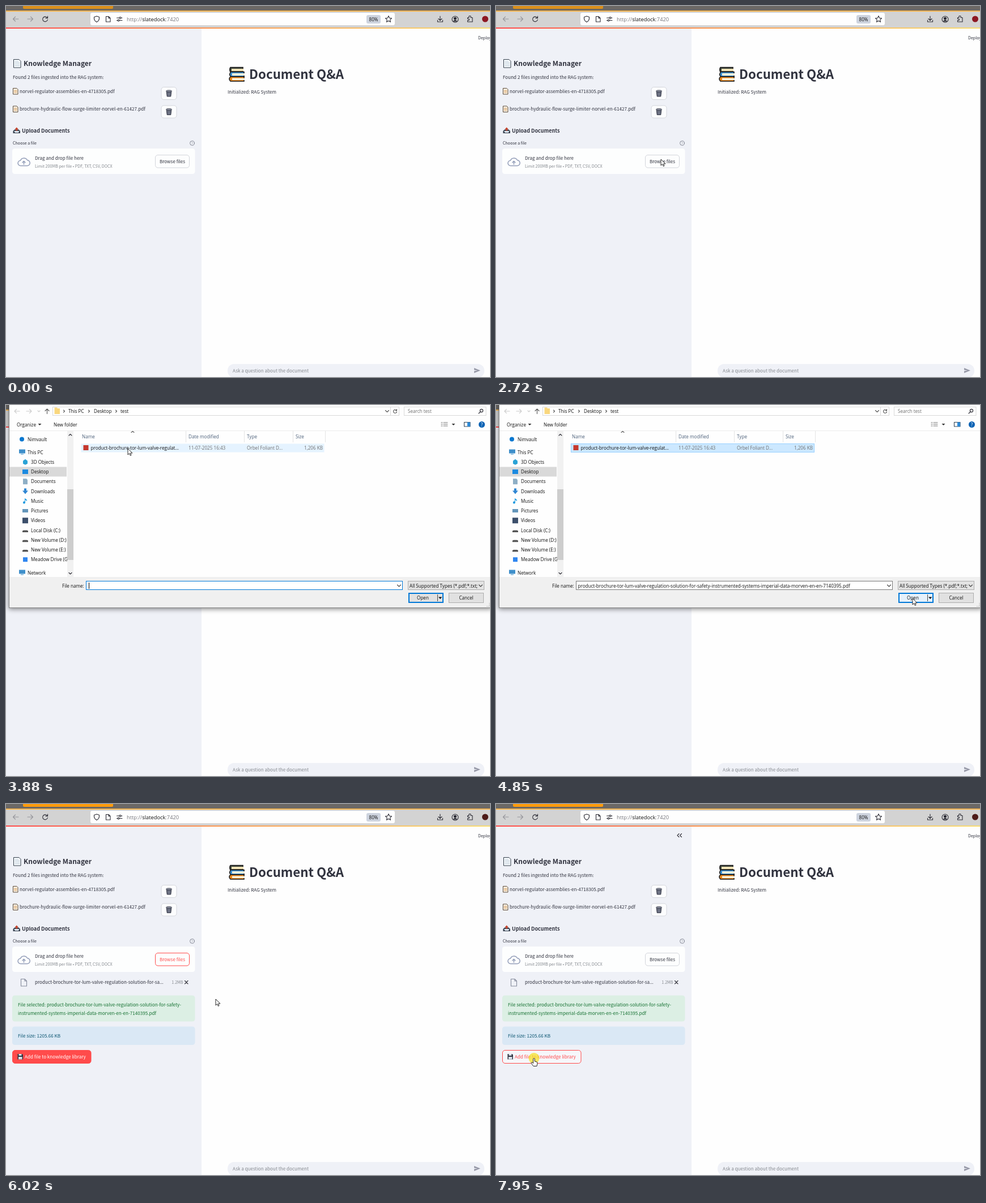
Write an HTML page that moves like this. It is 854 px wide and 656 px high and loops after 8 s.

```html
<!DOCTYPE html>
<html lang="en">
<head>
<meta charset="utf-8">
<title>Document upload</title>
<style>
html, body { margin: 0; width: 100%; height: 100%; overflow: hidden; background: #fefefe }
svg { display: block; width: 854px; height: 656px }
text { font: 8.11px "Noto Sans CJK JP", "Noto Sans CJK SC", "Noto Sans", sans-serif; fill: #31333f; white-space: pre }
.ui { font: 8.15px "Open Sans", "Noto Sans", sans-serif; fill: #111 }
.ui text { font: inherit; fill: inherit }
.small { font-size: 7.1px }
.grey { fill: #85898f }
.line { fill: none; stroke: #2c2c35; stroke-width: 1.1; stroke-linecap: round; stroke-linejoin: round }
.mid { text-anchor: middle }
.end { text-anchor: end }
.bold { font-weight: 700 }
.ui .head { fill: #4c607a }
.ui .dim { fill: #6d6d6d }
#dialog { filter: drop-shadow(0 2px 4px #0007) }
</style>
</head>
<body>
<svg viewBox="0 0 854 656">
<defs>
  <linearGradient id="glow"><stop stop-color="#ff4b4b"/><stop offset=".45" stop-color="#fb9a52"/><stop offset="1" stop-color="#f7dc72"/></linearGradient>
  <clipPath id="navClip"><path d="M6 46H108V304H6Z"/></clipPath>
  <g id="sheet">
    <path d="M.5.5H7L9 2.5V11H.5Z" fill="#fbf7ee" stroke="#5b4630"/>
    <path d="M2 4H7.5M2 6H7.5M2 8H7.5" stroke="#d08a3c" stroke-width=".8"/>
  </g>
  <g id="bin">
    <rect x=".5" y=".5" width="27" height="22" rx="4.5" fill="#fcfdfe" stroke="#d3d5db"/>
    <path d="M9.5 7.5H18.5L17.3 17H10.7Z" fill="#555a6c" stroke="#30333f" stroke-width=".8"/>
    <ellipse cx="14" cy="7.4" rx="5" ry="1.5" fill="#8d92a3" stroke="#30333f" stroke-width=".8"/>
    <path d="M12 10L12.5 16M14 10V16M16 10L15.5 16" stroke="#9da2b2" stroke-width=".6"/>
  </g>
</defs>

<!-- Browser chrome -->
<rect width="854" height="9" fill="#6b6865"/>
<rect id="tab" x="30" y="-4" width="159" height="9" rx="2"/>
<rect y="8" width="854" height="2" fill="#f3b552"/>
<rect y="10" width="854" height="28" fill="#d3d3d3"/>
<rect x="149" y="12" width="537" height="22" rx="3" fill="#fefefe"/>
<g class="line">
  <path d="M22 23H12.5M16.5 19L12.5 23L16.5 27M38 23H47.5M43.5 19L47.5 23L43.5 27" stroke="#96969c"/>
  <path d="M72.5 20.5A4.4 4.4 0 1 0 73.4 24M73.5 18V21.4H70"/>
  <path d="M160 18L164.5 19.5C165 24 163 27 160 28.5C157 27 155 24 155.5 19.5Z"/>
  <path d="M176.5 18.5H181L184 21.5V28H176.5ZM181 18.5V21.5H184"/>
  <path d="M195.5 21H200M203 21H205M195.5 25.5H197M200 25.5H205"/><circle cx="201.5" cy="21" r="1.5"/><circle cx="198.5" cy="25.5" r="1.5"/>
  <path d="M675 17.5L676.7 21.2 680.5 21.6 677.7 24.3 678.5 28.3 675 26.3 671.5 28.3 672.3 24.3 669.5 21.6 673.3 21.2Z"/>
  <path d="M766 18V25M763 22.5L766 25.5L769 22.5M761.5 25V28H770.5V25"/>
  <circle cx="792.5" cy="23.5" r="5.5"/><circle cx="792.5" cy="22" r="2" fill="#2c2c35"/><path d="M789.5 27Q792.5 23.5 795.5 27Z" fill="#2c2c35"/>
  <path d="M814.5 20.5H817Q816 17.5 818.5 17.5T820 20.5H823V28H814.5V25.5Q817.5 25.5 817.5 24T814.5 22.8Z"/>
</g>
<circle id="badge" cx="845.5" cy="23" r="5.5"/>
<g class="ui">
  <text x="213" y="27" style="font-size:9.3px;fill:#77777d">http://<tspan fill="#111">slatedock</tspan>:7420</text>
  <rect x="636" y="16" width="25" height="15" rx="3" fill="#cdd3de"/>
  <text class="mid" x="648.5" y="26.5">80%</text>
</g>

<!-- Sidebar -->
<rect y="40" width="345" height="616" fill="#eff1f7"/>
<rect y="38" width="854" height="2" fill="url(#glow)"/>
<path id="collapse" class="line" d="M323 52.5L320 55.5L323 58.5M327.5 52.5L324.5 55.5L327.5 58.5"/>
<path d="M13.5 94.5H23L26 97.5V109H13.5Z" fill="#f4f8fb" stroke="#34404c"/>
<path d="M15.5 98H22M15.5 100.5H24M15.5 103H24M15.5 105.5H24" stroke="#b5c6d2" stroke-width=".8"/>
<text class="bold" x="31" y="106" style="font-size:12px">Knowledge Manager</text>
<text x="12" y="129">Found 2 files ingested into the RAG system:</text>
<use href="#sheet" x="12" y="145"/><text x="24" y="153.5">norvel-regulator-assemblies-en-4718305.pdf</text>
<use href="#sheet" x="12" y="176.5"/><text x="24" y="185">brochure-hydraulic-flow-surge-limiter-norvel-en-61427.pdf</text>
<use href="#bin" x="273.5" y="143"/><use href="#bin" x="273.5" y="175.5"/>
<path d="M12.5 221L15 218.5H22.5L25 221V225H12.5Z" fill="#37414f"/><path d="M14 221H23.5L22 224H16Z" fill="#dce5ee"/><path d="M18.7 214.5L22 218H20.2V220.5H17.2V218H15.5Z" fill="#c4452e"/>
<text class="bold" x="28" y="223.5" style="font-size:9px">Upload Documents</text>
<text class="small" x="12" y="245">Choose a file</text>
<circle cx="328.5" cy="242.5" r="3.9" class="line" style="stroke:#777b88;stroke-width:.9"/><text class="mid grey" x="328.5" y="244.8" style="font-size:6px">?</text>
<rect x="11" y="252" width="322.5" height="45" rx="4.5" fill="#fdfefe"/>
<path class="line" style="stroke:#929db8;stroke-width:1.5" d="M26 282.5A4.6 4.6 0 0 1 25.5 273.2A6.6 6.6 0 0 1 37.5 272.5A5 5 0 0 1 37 282.5ZM31.5 280V274.5M29 276.8L31.5 274.3L34 276.8"/>
<text x="51" y="271.5">Drag and drop file here</text>
<text class="small grey" x="51" y="286">Limit 200MB per file • PDF, TXT, CSV, DOCX</text>
<rect id="browse" x="263.5" y="263.5" width="60" height="22.5" rx="4.5"/>
<text id="browseText" class="mid" x="293.5" y="278">Browse files</text>

<g id="fileRow">
  <path class="line" style="stroke:#858b9c" d="M26.5 309.5H33L36.5 313V322H26.5ZM33 309.5V313H36.5"/>
  <text x="51" y="317.8">product-brochure-tor-lum-valve-regulation-solution-for-sa...</text>
  <text class="small grey end" x="312.5" y="317.8">1.2MB</text>
  <path class="line" d="M315.5 312.5L321 318M321 312.5L315.5 318"/>
</g>
<g id="details">
  <rect x="11" y="338.5" width="322.5" height="46" rx="4.5" fill="#dcefe4"/>
  <text x="21" y="358" style="fill:#177233">File selected: product-brochure-tor-lum-valve-regulation-solution-for-safety-</text>
  <text x="21" y="372.5" style="fill:#177233">instrumented-systems-imperial-data-morven-en-en-7140395.pdf</text>
  <rect x="11" y="393.5" width="322.5" height="32.5" rx="4.5" fill="#dae8f5"/>
  <text x="21" y="413" style="fill:#0b5570">File size: 1205.66 KB</text>
  <rect id="add" x="11.5" y="435.5" width="138.5" height="23" rx="4.5"/>
  <path d="M20.5 442H28.5L30 443.5V451.5H20.5Z" fill="#2d3340"/><path d="M22.5 442H27.5V445H22.5ZM22 447H28.5V451.5H22Z" fill="#d8e0e8"/>
  <text id="addText" x="33" y="449.8">Add file to knowledge library</text>
</g>

<!-- Main column -->
<text class="small" x="833" y="58.5">Deploy</text>
<g stroke="#1d1d1d" stroke-width="1.6">
  <path d="M396 108.5H418V116.5H396Q393.5 112.5 396 108.5Z" fill="#41483f"/><path d="M398 111H419V115H398Z" fill="#f5e6b8" stroke="none"/>
  <path d="M397 116.5H420V125H397Q392 121 397 116.5Z" fill="#3b8fd0"/><path d="M399 119H421V123H399Z" fill="#fbf3dd" stroke="none"/>
  <path d="M396 125H420V133H396Q392 129 396 125Z" fill="#ee8a1d"/><path d="M399 127.5H421V131H399Z" fill="#fbf3dd" stroke="none"/>
</g>
<text class="bold" x="429" y="129" style="font-size:22.3px">Document Q&amp;A</text>
<text x="391" y="155">Initialized: RAG System</text>
<rect x="391" y="633" width="453" height="24" rx="11.5" fill="#eff1f7"/>
<text class="grey" x="400" y="647.5">Ask a question about the document</text>
<path d="M826 640L837 644.5L826 649V645.5L832 644.5L826 643.5Z" fill="#9799a7"/>

<!-- File dialog -->
<g id="dialog" class="ui">
  <rect x="5.5" y="-58" width="851.5" height="416.5" fill="#fefefe" stroke="#858585"/>
  <rect x="6" y="304" width="850.5" height="54" fill="#f0f0f0"/>
  <rect x="82.5" y="3.5" width="611" height="15" fill="#fff" stroke="#d9d9d9"/><path d="M678.5 3.5V18.5" stroke="#d9d9d9"/>
  <rect x="702.5" y="3.5" width="144.5" height="15" fill="#fff" stroke="#d9d9d9"/>
  <path d="M85.5 4.5H90L91 6H95V16H85.5Z" fill="#f9d77e"/>
  <g class="line">
    <path d="M24 11H15M18.5 7.5L15 11L18.5 14.5M36 11H45M41.5 7.5L45 11L41.5 14.5M56 10L58 12L60 10" style="stroke:#ccc"/>
    <path d="M72.5 15.5V7M69 10.5L72.5 7L76 10.5M101.5 9L103.5 11L101.5 13M145.5 9L147.5 11L145.5 13M193.5 9L195.5 11L193.5 13M669.5 9.5L672.5 12.5L675.5 9.5M689 9.5A3 3 0 1 0 689.5 12M689.5 7.5V10H687M221 48.5L223.5 46.5L226 48.5" style="stroke:#555"/>
    <circle cx="839" cy="10" r="2.6"/><path d="M837 12L834 15"/>
    <path d="M768 31H770M772 31H779M768 34H770M772 34H779M768 37H770M772 37H779" style="stroke:#777"/>
    <path d="M808.5 30.5H819V38H808.5Z" style="stroke:#345"/>
  </g>
  <path d="M814 30.5H819V38H814Z" fill="#2e8bd8"/>
  <path d="M56.5 33H62.5L59.5 36ZM786.5 33H792.5L789.5 36Z" fill="#333"/>
  <circle cx="839.5" cy="34.5" r="5.5" fill="#0b62b4"/><text class="mid bold" x="839.5" y="37.5" style="fill:#fff">?</text>
  <text x="110" y="14">This PC</text><text x="155" y="14">Desktop</text><text x="202" y="14">test</text>
  <text class="dim" x="709" y="14">Search test</text>
  <text x="19" y="37.5">Organize</text><text x="84" y="37.5">New folder</text>
  <path d="M6 45.5H856" stroke="#ececec"/>
  <g clip-path="url(#navClip)"><path d="M6 109.5H107V126.5H6Z" fill="#d9d9d9"/><g id="nav"></g></g>
  <path d="M108 46H119V304H108Z" fill="#f1f1f1"/><path d="M108 149H119V274H108Z" fill="#cdcdcd"/>
  <path class="line" d="M111 54L113.5 51.5L116 54M111 296.5L113.5 299L116 296.5"/>
  <path d="M317.5 46V66M420.5 46V66M506.5 46V66M563.5 46V66" stroke="#e4e4e4"/>
  <text class="head" x="134" y="58.5">Name</text><text class="head" x="322" y="58.5">Date modified</text><text class="head" x="425" y="58.5">Type</text><text class="head" x="511" y="58.5">Size</text>
  <rect id="row" x="132.5" y="68.5" width="429" height="15"/>
  <rect x="136.5" y="71" width="9" height="9" fill="#c5382d"/>
  <text x="149.5" y="79.3">product-brochure-tor-lum-valve-regulat...</text>
  <text class="dim" x="322" y="79.3">11-07-2025 16:43</text><text class="dim" x="425" y="79.3">Orbel Foliant D...</text><text class="dim end" x="559" y="79.3">1,206 KB</text>

  <text x="99" y="322.5">File name:</text>
  <rect id="field" x="141.5" y="311.5" width="558" height="15" fill="#fff"/>
  <rect id="mark" x="144" y="313" height="12.5" fill="#2a86d8"/>
  <path id="caret" d="M146.5 314V325" stroke="#000"/>
  <text id="name" x="144.5" y="322.5">product-brochure-tor-lum-valve-regulation-solution-for-safety-instrumented-systems-imperial-data-morven-en-en-7140395.pdf</text>
  <rect x="709.5" y="311.5" width="134" height="15" fill="#e3e3e3" stroke="#adadad"/>
  <text x="712" y="322.5">All Supported Types (*.pdf;*.txt;</text>
  <path class="line" style="stroke:#444" d="M690.5 318L693.5 321L696.5 318M834.5 318L837.5 321L840.5 318"/>
  <rect id="open" x="711" y="333" width="60" height="16" stroke-width="2"/>
  <path d="M761.5 335V347" stroke="#444"/><path d="M763 339.5H769.5L766.2 343Z" fill="#111"/>
  <text class="mid" x="735.5" y="343.5">Open</text>
  <rect x="781.5" y="332.5" width="61" height="17" fill="#e1e1e1" stroke="#adadad"/><text class="mid" x="812" y="343.5">Cancel</text>
  <path d="M853 350V356H847" fill="none" stroke="#aaa" stroke-dasharray="1 1"/>
</g>

<g id="pointer">
  <circle id="click" r="9.5" fill="#f4e22c" opacity=".75"/>
  <g fill="#fff" stroke="#111" stroke-width=".9">
    <path id="arrow" d="M0 0V11L2.6 8.6L4.3 12.4L6 11.7L4.4 8H8Z"/>
    <path id="hand" d="M-1.3 1Q0-1 1.3 1V5.5L5 6.5Q6.3 7 6 9.5L5 14H-1L-4.8 9Q-5 7-3.5 7.2L-1.3 9Z"/>
  </g>
</g>
</svg>

<script>
const LOOP = 8000;
const el = id => document.getElementById(id);
const show = (id, on) => { el(id).style.display = on ? '' : 'none'; };
const paint = (id, fill, stroke = '') => Object.assign(el(id).style, { fill, stroke });
const within = (t, [from, to]) => t >= from && t < to;

// Navigation entries: label, icon colour, icon outline in a 10 by 10 box
const DRIVE = 'M0 6L2 5H8L10 6V8.5H0Z', COMPUTER = 'M0 0H11V7H0ZM3 8H8V9H3Z';
const topLevel = { Nimvault: 60, 'This PC': 83, Network: 296 };
const entries = [
  ['Nimvault', '#0a78d0', 'M1 5A4 4 0 1 1 9 5A4 4 0 1 1 1 5Z'],
  ['This PC', '#3f8fca', COMPUTER],
  ['3D Objects', '#2aa3d6', 'M1 3L5 0L9 3V8L5 10L1 8Z'],
  ['Desktop', '#1b8ae0', 'M0 1H10V9H0Z'],
  ['Documents', '#8eafc6', 'M1 0H7L9 2V10H1Z'],
  ['Downloads', '#2f86d3', 'M3 0H7V4H10L5 10L0 4H3Z'],
  ['Music', '#1f9be0', 'M4 0L8 3V5L5 3V8A2 2 0 1 1 4 6Z'],
  ['Pictures', '#6496ba', 'M0 2H10V8H0Z'],
  ['Videos', '#3c4f6b', 'M0 0H10V10H0Z'],
  ['Local Disk (C:)', '#555', DRIVE],
  ['New Volume (D:)', '#555', DRIVE],
  ['New Volume (E:)', '#555', DRIVE],
  ['Meadow Drive (G:)', '#2f86f0', 'M1 1H9V9H1Z'],
  ['Network', '#3f8fca', COMPUTER],
];
el('nav').innerHTML = entries.map(([label, color, outline], i) => {
  const x = label in topLevel ? 23 : 29;
  const y = topLevel[label] ?? 83 + (i - 1) * 17.25;
  return `<path transform="translate(${x} ${y - 4.5})" d="${outline}" fill="${color}"/>
    <text x="${x + 15}" y="${y + 3.5}">${label}</text>`;
}).join('');

// Pointer path: time, x, y
const path = [
  [390, 725, 606], [810, 358, 369], [1010, 358, 369], [1760, 285, 268], [1830, 286, 268],
  [2100, 289, 271], [2640, 289, 271], [2720, 291, 271], [3250, 291, 271], [3880, 215, 77],
  [4220, 215, 77], [4640, 680, 338], [4850, 735, 342], [4920, 735, 342], [5060, 737, 331],
  [5480, 737, 331], [5660, 595, 330], [5740, 515, 328], [5810, 445, 328], [5880, 419, 330],
  [5950, 396, 337], [6020, 370, 345], [6790, 91, 443], [6860, 91, 443], [7470, 67, 449.5],
];
const clicks = [[2360, 2500], [4010, 4150], [5060, 5200], [7950, 8000]];

function pointerAt(t) {
  const next = path.findIndex(p => p[0] > t);
  if (next < 1) return path.at(next).slice(1);
  const [t0, x0, y0] = path[next - 1], [t1, x1, y1] = path[next];
  let k = (t - t0) / (t1 - t0);
  if (t1 - t0 > 300) k = k * k * (3 - 2 * k);
  return [x0 + (x1 - x0) * k, y0 + (y1 - y0) * k];
}

function dialogOpacity(t) {
  if (t < 3040) return 0;
  if (t < 5200) return Math.min(1, (t - 2970) / 250);
  return Math.max(0, 1 - (t - 5128) / 260);
}

function drawPage(t, over) {
  const focused = t >= 5340;
  paint('tab', focused ? '#ff9b0c' : '#da8f1b');
  paint('badge', focused ? '#4d1a17' : '#8d1722');
  show('collapse', over.sidebar);
  const pressBrowse = within(t, clicks[0]), pressAdd = within(t, clicks[3]);
  const browseRed = over.browse || within(t, [5400, 7950]);
  paint('browse', pressBrowse ? '#ff4b4b' : '#fdfefe', browseRed ? '#ff4b4b' : '#d3d5db');
  paint('browseText', pressBrowse ? '#fff' : browseRed ? '#ff4b4b' : '#31333f');
  show('fileRow', t >= 5550);
  show('details', t >= 5700);
  paint('add', pressAdd ? '#f6f7fb' : over.add ? '#ff3838' : '#ff4b4b', '#ff4b4b');
  paint('addText', pressAdd ? '#ff4b4b' : '#fff');
}

function drawDialog(t, over) {
  const alpha = dialogOpacity(t);
  const scale = 1 - 0.05 * (1 - alpha);
  const picked = t >= 4080, marked = t >= 5060;
  show('dialog', alpha > 0);
  el('dialog').setAttribute('opacity', alpha);
  el('dialog').setAttribute('transform', `translate(431 150) scale(${scale}) translate(-431 -150)`);
  if (marked) paint('row', '#d9d9d9');
  else if (picked) paint('row', '#cce8ff', '#99d1ff');
  else paint('row', over.row ? '#e5f3ff' : 'none');
  paint('field', '#fff', picked ? '#7a7a7a' : '#0078d7');
  show('caret', !picked);
  show('name', picked);
  show('mark', marked);
  paint('name', marked ? '#fff' : '#111');
  if (marked && alpha) el('mark').setAttribute('width', el('name').getComputedTextLength() + 1);
  paint('open', over.open ? '#e5f1fb' : '#e1e1e1', '#0078d7');
}

function draw(t) {
  const [x, y] = pointerAt(t);
  const inside = (left, top, right, bottom) => x > left && x < right && y > top && y < bottom;
  const over = {
    sidebar: (t < 2720 || t > 6020) && x < 345,
    browse: t < 2640 && inside(263, 263, 324, 287),
    add: t > 6020 && inside(11, 435, 150, 459),
    row: inside(132, 68, 562, 84),
    open: inside(710, 332, 772, 350),
  };
  drawPage(t, over);
  drawDialog(t, over);

  const hand = over.browse || over.add;
  show('pointer', t >= 390);
  el('pointer').setAttribute('transform', `translate(${x} ${y})`);
  show('click', clicks.some(span => within(t, span)));
  show('hand', hand);
  show('arrow', !hand);
}

function frame() {
  draw(performance.now() % LOOP);
  requestAnimationFrame(frame);
}
frame();
</script>
</body>
</html>
```
